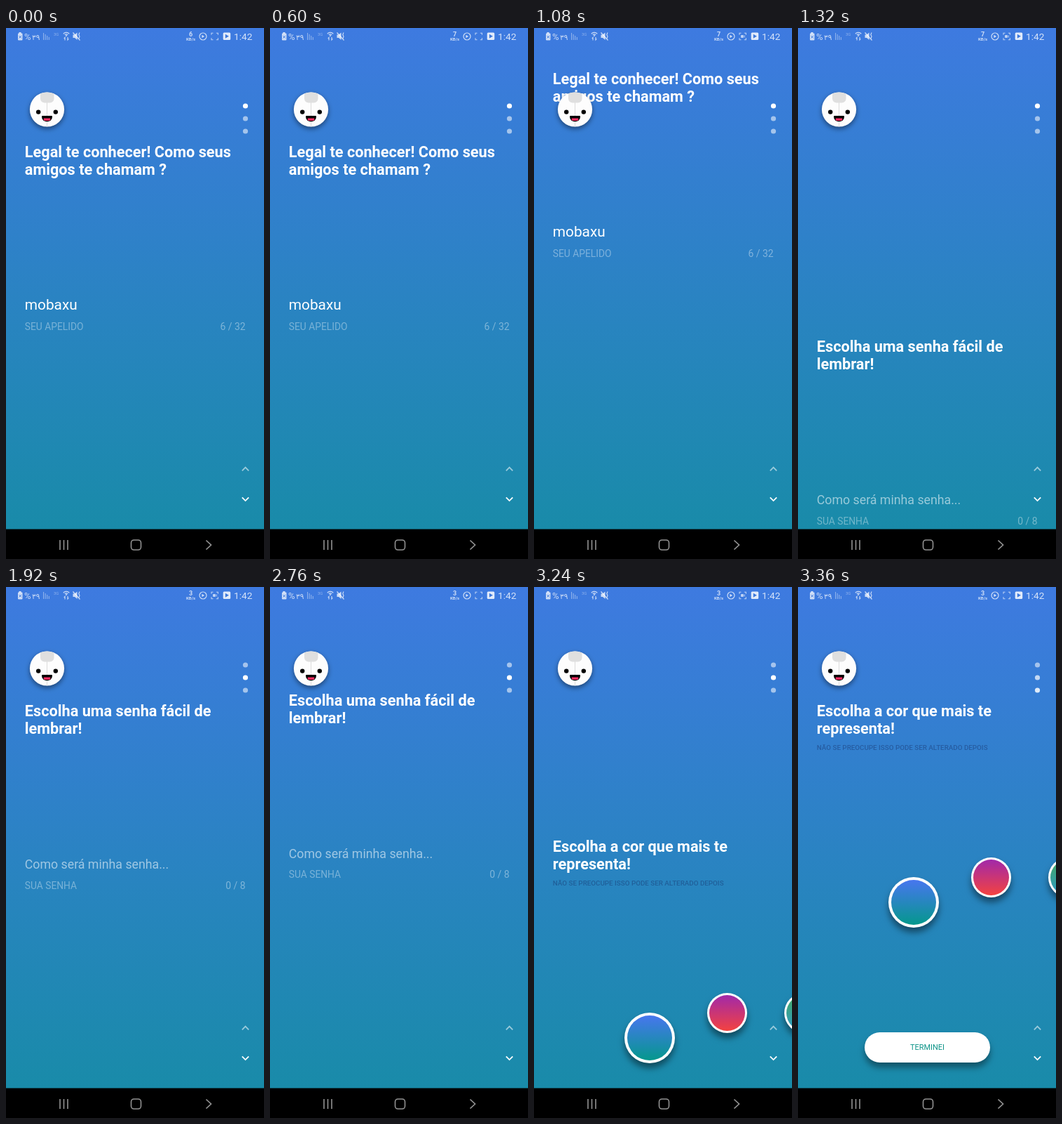
Write an HTML page with a canvas that moves like this. It is 368 px wide and 756 px high and loops after 3.48 s.

```html
<!DOCTYPE html>
<html lang="pt">
<head>
<meta charset="utf-8">
<title>Cadastro</title>
<style>
  html, body { margin: 0; width: 100%; height: 100%; overflow: hidden; background: #000; }
  canvas { display: block; width: 368px; height: 756px; }
</style>
</head>
<body>
<canvas id="stage"></canvas>
<script>
const W = 368, H = 756, PAGE = 713, LOOP = 3480, STEP = 120;
const canvas = document.getElementById('stage');
const scale = window.devicePixelRatio || 1;
canvas.width = W * scale;
canvas.height = H * scale;
const ctx = canvas.getContext('2d');
ctx.scale(scale, scale);

// Scroll distance per step once a page starts to move.
const scrolls = [
  { start: 720, path: [3, 15.5, 46, 104, 230, 436, 640, PAGE] },
  { start: 2760, path: [15.5, 46, 115, 260, 520, PAGE] }
];

const white = a => `rgba(255,255,255,${a})`;

function text(str, x, y, size, color, weight = 400, align = 'left', family = 'Roboto, sans-serif') {
  ctx.font = `${weight} ${size}px ${family}`;
  ctx.fillStyle = color;
  ctx.textAlign = align;
  ctx.fillText(str, x, y);
}

function disc(x, y, r, color) {
  ctx.fillStyle = color;
  ctx.beginPath();
  ctx.arc(x, y, r, 0, Math.PI * 2);
  ctx.fill();
}

function line(points, color, width) {
  ctx.strokeStyle = color;
  ctx.lineWidth = width;
  ctx.beginPath();
  points.forEach(([x, y], i) => i ? ctx.lineTo(x, y) : ctx.moveTo(x, y));
  ctx.stroke();
}

function box(x, y, w, h, radius, color) {
  ctx.fillStyle = color;
  ctx.beginPath();
  ctx.roundRect(x, y, w, h, radius);
  ctx.fill();
}

function vertical(y0, y1, top, bottom) {
  const g = ctx.createLinearGradient(0, y0, 0, y1);
  g.addColorStop(0, top);
  g.addColorStop(1, bottom);
  return g;
}

function withShadow(dy, blur, alpha, draw) {
  ctx.save();
  ctx.shadowColor = `rgba(0,0,0,${alpha})`;
  ctx.shadowOffsetY = dy * scale;
  ctx.shadowBlur = blur * scale;
  draw();
  ctx.restore();
}

function heading(first, second) {
  text(first, 26.8, 184, 21.7, '#fff', 700);
  text(second, 26.8, 209, 21.7, '#fff', 700);
}

function field(label, count) {
  text(label, 26.8, 429.5, 13.8, white(0.38));
  text(count, 341.5, 429.5, 13.9, white(0.4), 400, 'right');
}

function swatch(x, y, r, border, top, bottom) {
  withShadow(7, 10, 0.45, () => disc(x, y, r, '#fff'));
  disc(x, y, r - border, vertical(y - r, y + r, top, bottom));
}

const pages = [
  () => {
    heading('Legal te conhecer! Como seus', 'amigos te chamam ?');
    text('mobaxu', 26.8, 401, 20.8, '#fff');
    field('SEU APELIDO', '6 / 32');
  },
  () => {
    heading('Escolha uma senha fácil de', 'lembrar!');
    text('Como será minha senha...', 26.8, 401, 17.75, white(0.55));
    field('SUA SENHA', '0 / 8');
  },
  () => {
    heading('Escolha a cor que mais te', 'representa!');
    text('NÃO SE PREOCUPE ISSO PODE SER ALTERADO DEPOIS', 26.8, 232.3, 9.8, 'rgba(20,40,95,.4)', 500);
    swatch(165, 449, 36, 4, '#4c74f5', '#009a86');
    swatch(275.5, 413.5, 28.5, 3, '#9c27b0', '#f8443a');
    swatch(385.5, 413.5, 28.5, 3, '#45a85a', '#2b9bd0');
    withShadow(7, 10, 0.4, () => box(95, 634, 179, 43, 21.5, '#fff'));
    text('TERMINEI', 184.5, 659, 10.95, '#0d9488', 400, 'center');
  }
];

function mascot() {
  withShadow(3, 7, 0.45, () => disc(58.5, 116, 24.6, '#fdfdfd'));
  ctx.save();
  ctx.beginPath();
  ctx.arc(58.5, 116, 24.6, 0, Math.PI * 2);
  ctx.clip();
  box(49, 88, 19.5, 18.5, 6, '#dfdfdf');
  ctx.restore();
  line([[58.5, 106], [58.5, 140.5]], '#dcdcdc', 1);
  disc(46.2, 119.6, 3.2, '#000');
  disc(70.8, 119.6, 3.2, '#000');
  box(51, 125, 15, 8.3, [1, 1, 7, 7], '#000');
  box(53.5, 128.5, 10, 3.6, [2, 2, 4, 4], '#f02a5e');
}

function statusBar(speed, recording) {
  const ink = white(0.75), dim = white(0.42);
  // battery, charge and signal
  box(18.5, 6, 3, 2, 0, ink);
  box(17, 7.5, 6.5, 10, 1, ink);
  line([[18.5, 11], [22, 14.5]], '#3d79dc', 1);
  line([[22, 11], [18.5, 14.5]], '#3d79dc', 1);
  text('%', 26, 17, 13, ink);
  text('٣٩', 37, 17, 10.5, ink, 400, 'left', '"DejaVu Sans", sans-serif');
  [10, 8, 6, 4].forEach((h, i) => box(53 + i * 2.6, 17 - h, 1.1, h, 0, dim));
  text('3G', 68, 10.5, 6, dim);
  // wireless
  ctx.strokeStyle = ink;
  ctx.lineWidth = 1.2;
  for (const r of [2.6, 5.2]) {
    ctx.beginPath();
    ctx.arc(86, 11.5, r, -Math.PI * 0.8, -Math.PI * 0.2);
    ctx.stroke();
  }
  disc(86, 11, 1, ink);
  line([[84, 17.5], [84, 13.5], [82.7, 15]], ink, 1.1);
  line([[88, 13], [88, 17], [89.3, 15.5]], ink, 1.1);
  // muted speaker
  ctx.fillStyle = ink;
  ctx.beginPath();
  ctx.moveTo(95.5, 9.5);
  ctx.lineTo(98, 9.5);
  ctx.lineTo(101.5, 6.5);
  ctx.lineTo(101.5, 17);
  ctx.lineTo(98, 14);
  ctx.lineTo(95.5, 14);
  ctx.fill();
  line([[95.5, 6.5], [105.5, 17.5]], ink, 1.2);
  line([[105, 6.5], [103.8, 9.5], [105, 12], [104, 15]], ink, 1.1);
  // network speed
  text(speed, 263.7, 11.5, 9, ink, 700, 'center');
  text('KB/s', 263.5, 18, 6, ink, 700, 'center');
  // recorder icons
  ctx.strokeStyle = ink;
  ctx.lineWidth = 1.2;
  ctx.beginPath();
  ctx.arc(281, 12, 5, 0, Math.PI * 2);
  ctx.stroke();
  play(280.9, 12, 2.2, ink);
  for (const sx of [-1, 1]) for (const sy of [-1, 1]) {
    const x = 297.7 + sx * 4.7, y = 12 + sy * 4.8;
    line([[x - sx * 2.5, y], [x, y], [x, y - sy * 2.5]], white(0.65), 1.1);
  }
  if (recording) {
    box(295, 10, 4, 4, 1, white(0.65));
    line([[300.3, 10.5], [300.3, 13.5]], white(0.65), 1);
  }
  box(309.7, 6.5, 10.5, 10.5, 1.5, white(0.85));
  play(314.9, 11.8, 3, '#3d79dc');
  text('1:42', 351.3, 17, 13.6, white(0.78), 400, 'right');
}

function play(x, y, r, color) {
  ctx.fillStyle = color;
  ctx.beginPath();
  ctx.moveTo(x - r * 0.7, y - r);
  ctx.lineTo(x + r, y);
  ctx.lineTo(x - r * 0.7, y + r);
  ctx.fill();
}

function navBar() {
  const gray = '#929292';
  ctx.fillStyle = '#000';
  ctx.fillRect(0, PAGE + 0.5, W, H - PAGE);
  for (const x of [77, 82.5, 88]) line([[x, 729], [x, 743]], gray, 1.6);
  ctx.beginPath();
  ctx.roundRect(178.5, 729, 14, 14, 4);
  ctx.stroke();
  line([[285.5, 729.5], [292.5, 736], [285.5, 742.5]], gray, 1.7);
}

function scrollAt(t) {
  return scrolls.reduce((sum, { start, path }) => {
    const i = Math.floor((t - start) / STEP);
    return i < 0 ? sum : sum + path[Math.min(i, path.length - 1)];
  }, 0);
}

function dotPosition(t) {
  if (t >= 3360) return 1.65;
  if (t >= 1560) return 1;
  return t >= 1440 ? 0.4 : 0;
}

function draw(t) {
  ctx.fillStyle = vertical(0, PAGE, '#3e7ae0', '#198ba9');
  ctx.fillRect(0, 0, W, H);

  const scroll = scrollAt(t);
  pages.forEach((page, i) => {
    const y = i * PAGE - scroll;
    if (Math.abs(y) >= PAGE) return;
    ctx.save();
    ctx.translate(0, y);
    page();
    ctx.restore();
  });

  mascot();
  const active = dotPosition(t);
  for (let i = 0; i < 3; i++) {
    const level = Math.max(0, 1 - Math.abs(active - i));
    disc(341.5, 111 + i * 18, 3.6, white(0.55 + 0.45 * level));
  }
  line([[336.8, 630.3], [341.5, 625.6], [346.2, 630.3]], white(0.55), 1.8);
  line([[336.8, 668.4], [341.5, 673.1], [346.2, 668.4]], '#fff', 1.8);

  const speed = t < 120 ? '6' : t < 1920 ? '7' : '3';
  const recording = (t >= 960 && t < 2400) || (t >= 2880 && t < 3360);
  statusBar(speed, recording);
  navBar();
}

const begin = performance.now();
function tick() {
  const t = (performance.now() - begin) % LOOP;
  draw(Math.floor(t / STEP) * STEP);
  requestAnimationFrame(tick);
}
tick();
</script>
</body>
</html>
```
